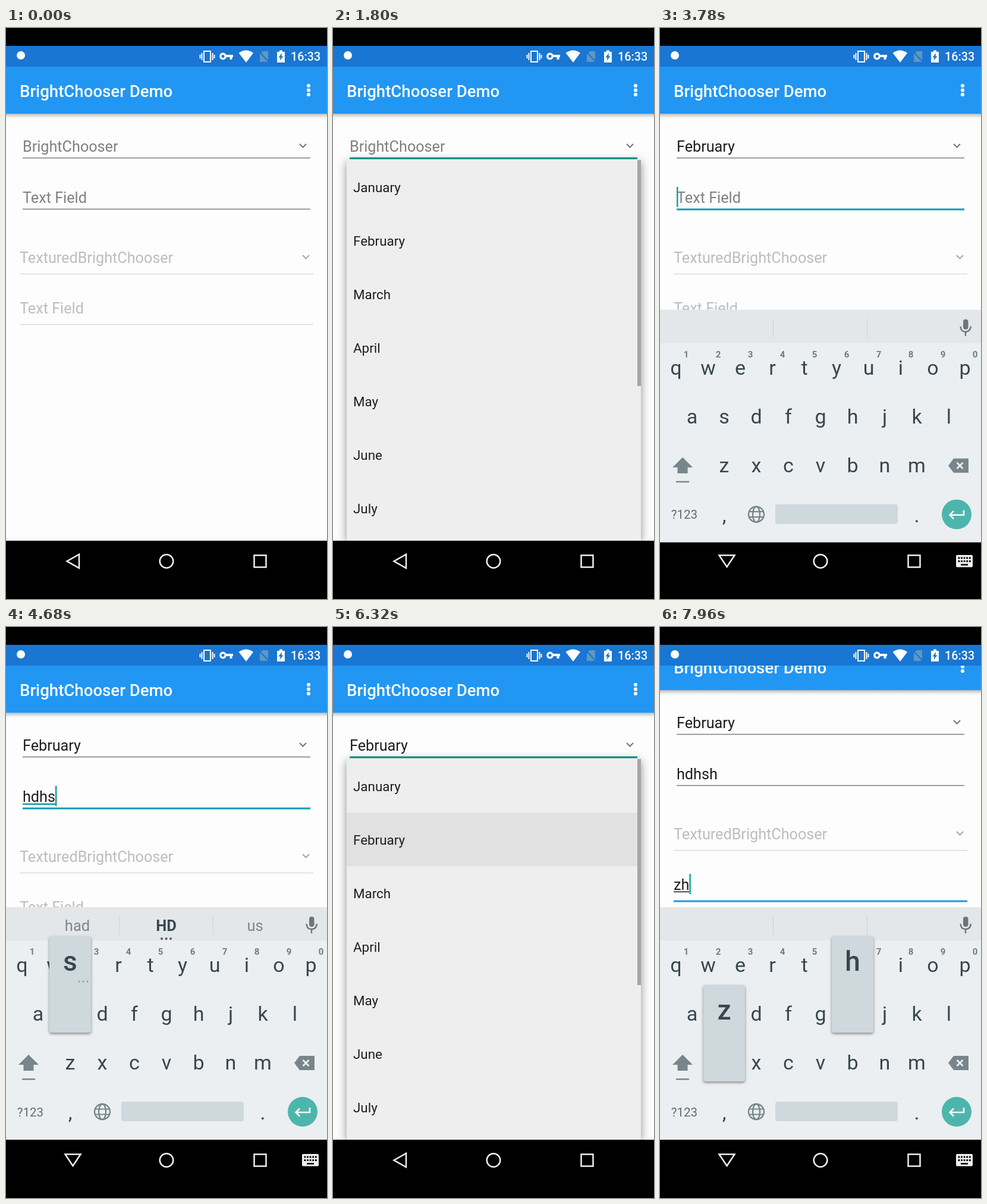
Recreate the animation shown at these times as an HTML page with a canvas. Size 540 by 960 pixels, loop 8000 ms.

```html
<!DOCTYPE html>
<html lang="en">
<head>
<meta charset="utf-8">
<title>Dropdown demo</title>
<style>
html, body { margin: 0; height: 100%; overflow: hidden; background: #000; }
canvas { display: block; width: 100vw; height: 100vh; }
</style>
</head>
<body>
<canvas id="stage" width="540" height="960"></canvas>
<script>
const ctx = document.getElementById('stage').getContext('2d');
const LOOP = 8000;
const INK = '#1e1e1e', HINT = '#808080', PALE = '#bdbdbd', WHITE = '#fdfdfd', NAV = '#f0f0f0';
const BAR = '#2196f3', STATUS = '#1976d2', LIST = '#eeeeee', BOARD = '#eceff1';
const TEAL = '#009688', CYAN = '#0c9bb4', BLUE = '#2199e0';
const MONTHS = ['January', 'February', 'March', 'April', 'May', 'June', 'July', 'August'];
const ROWS = [['qwertyuiop', 27, 580], ['asdfghjkl', 54, 662], ['zxcvbnm', 108, 744]];

// Key presses: letter, press time, release time
const FIRST = [['h', 4110, 4230], ['d', 4270, 4390], ['h', 4430, 4550], ['s', 4590, 4730], ['h', 4740, 4900]];
const SECOND = [['z', 7800, 8000], ['h', 7910, 8000]];
const SUGGESTIONS = [
  [4180, ['he', 'have', 'how']],
  [4390, ['had', 'HD', 'us']],
  [4850, ['handheld', 'sunshine', 'Ushant']]
];

// Times at which each input takes the focus, and the two visits to the list
const FOCUS = { spinner: 500, field: 3380, again: 5360, material: 7220 };
const VISITS = [
  { open: 600, press: 1960, close: 2140 },
  { open: 5460, press: 6260, close: 6340 }
];
const KEYS_IN = [3560, 7434], KEYS_OUT = 5652;

const clamp = v => Math.max(0, Math.min(1, v));
const ramp = (t, start, length) => clamp((t - start) / length);
const easeOut = (p, power = 2) => 1 - (1 - p) ** power;
const within = (t, a, b) => t >= a && t < b;
const typed = (keys, t) => keys.filter(k => t >= k[1] + 20).map(k => k[0]).join('');

function rect(x, y, w, h, color, r = 0) {
  ctx.fillStyle = color;
  ctx.beginPath();
  ctx.roundRect(x, y, w, h, r);
  ctx.fill();
}

function disc(x, y, r, color) {
  ctx.fillStyle = color;
  ctx.beginPath();
  ctx.arc(x, y, r, 0, 7);
  ctx.fill();
}

function ring(x, y, rx, ry, color, width) {
  ctx.strokeStyle = color;
  ctx.lineWidth = width;
  ctx.beginPath();
  ctx.ellipse(x, y, rx, ry, 0, 0, 7);
  ctx.stroke();
}

function fill(d, color) {
  ctx.fillStyle = color;
  ctx.fill(new Path2D(d));
}

function stroke(d, color, width) {
  ctx.strokeStyle = color;
  ctx.lineWidth = width;
  ctx.stroke(new Path2D(d));
}

function text(s, x, y, size, color, align = 'left', weight = 400) {
  ctx.font = `${weight} ${size}px Roboto, sans-serif`;
  ctx.textAlign = align;
  ctx.fillStyle = color;
  ctx.fillText(s, x, y);
  return ctx.measureText(s).width;
}

function shadowed(blur, dy, color, draw) {
  ctx.save();
  ctx.shadowColor = color;
  ctx.shadowBlur = blur;
  ctx.shadowOffsetY = dy;
  draw();
  ctx.restore();
}

function group(draw, alpha = 1, dy = 0) {
  if (alpha <= 0) return;
  ctx.save();
  ctx.globalAlpha = alpha;
  ctx.translate(0, dy);
  draw();
  ctx.restore();
}

function statusBar() {
  rect(0, 30, 540, 35, STATUS);
  disc(25, 46, 7, WHITE);
  stroke('M333 39H344V57H333ZM329.5 42V54M347.5 42V54M326.5 45V51M350.5 45V51', WHITE, 2);
  stroke('M370 47H382M378.5 47V53', WHITE, 4);
  ring(365, 47.5, 4.2, 4.2, WHITE, 3.4);
  fill('M391.5 42Q404 33 416 42L404 58Z', WHITE);
  fill('M432 39H441V57H427V44Z', '#5c98c4');
  stroke('M425 39L442 57', STATUS, 2);
  fill('M456 40H460V37.5H465V40H469V58H456Z', WHITE);
  fill('M464 42L458.5 49.5H461.5L460.5 55L466.5 47.5H463.5Z', STATUS);
  text('16:33', 479, 55, 19.8, WHITE, 'left', 500);
}

function appBar() {
  const shade = ctx.createLinearGradient(0, 143, 0, 153);
  shade.addColorStop(0, 'rgba(110,110,110,.6)');
  shade.addColorStop(1, 'rgba(200,200,200,0)');
  rect(0, 143, 540, 10, shade);
  rect(0, 60, 540, 84, BAR);
  text('BrightChooser Demo', 23, 115.5, 27.6, WHITE, 'left', 500);
  for (const y of [97, 104.5, 112]) disc(509, y, 3.1, WHITE);
}

// One input row; material rows are wider and paler
function field({ y, value, hint, focus, cursor, composing, arrow, material, accent }) {
  const x = material ? 23 : 28, right = material ? 517 : 512;
  const base = y - (material ? 18 : 10);
  const width = text(value || hint, x, base, 25.2, value ? INK : material ? PALE : HINT);
  if (arrow) {
    const cx = right - 12.5;
    stroke(`M${cx - 5.5} ${base - 13}l5.5 5.5l5.5 -5.5`, material ? '#a6a6a6' : '#757575', 2);
  }
  if (focus) rect(x, y - .5, right - x, 3, accent);
  else rect(x, y - .2, right - x, 1.4, material ? '#dadada' : '#7d7d7d');
  if (composing && value) rect(x, base + 2.5, width, material ? 1.5 : 2.5, material ? INK : CYAN);
  if (cursor) rect(x + (value ? width : 0), base - 27, 2.4, 34, '#0ca09a');
}

function content(t) {
  const chosen = t >= VISITS[0].close ? 'February' : '';
  const spinner = within(t, FOCUS.spinner, FOCUS.field) || within(t, FOCUS.again, FOCUS.material);
  const first = within(t, FOCUS.field, FOCUS.again), last = t >= FOCUS.material;
  rect(0, 65, 540, 797, WHITE);
  field({ y: 218, value: chosen, hint: 'BrightChooser', focus: spinner, arrow: true, accent: TEAL });
  field({ y: 304, value: typed(FIRST, t), hint: 'Text Field', focus: first, accent: CYAN,
    composing: first, cursor: within(t, 3450, 3950) || within(t, 4110, 5190) });
  field({ y: 413, hint: 'TexturedBrightChooser', arrow: true, material: true });
  field({ y: 498, value: typed(SECOND, t), hint: 'Text Field', focus: last, material: true,
    accent: BLUE, composing: true, cursor: last });
  appBar();
}

// The list grows out of the spinner line, then fades; its scrollbar fades after a pause
function dropdown(t, { open, press, close }) {
  const grow = ramp(t, open, 400);
  const alpha = easeOut(ramp(t, open, 200), 3) * (1 - ramp(t, close, 210));
  const scale = .9 + .1 * easeOut(grow, 5);
  const bottom = within(t, FOCUS.again, 5900) ? 473 : 862;
  group(() => {
    ctx.translate(270.5, 221);
    ctx.scale(scale, scale);
    ctx.translate(-270.5, -221);
    shadowed(16, 4, 'rgba(70,70,70,.6)', () => rect(23, 221, 495, bottom - 221, LIST, 2));
    ctx.beginPath();
    ctx.rect(23, 221, 495, bottom - 221);
    ctx.clip();
    rect(23, 312, 495, 90, `rgba(90,90,90,${.18 * ramp(t, press, 120)})`);
    MONTHS.forEach((m, i) => text(m, 34, 275.5 + 90 * i, 22.4, INK));
    ctx.globalAlpha *= 1 - ramp(t, open + 1200, 250);
    rect(512, 222, 6, bottom > 500 ? 380 : 58, '#a6a6a6');
  }, alpha);
}

function keyPopup(letter) {
  const row = ROWS.find(r => r[0].includes(letter));
  const x = row[1] + 54 * row[0].indexOf(letter), y = row[2];
  shadowed(4, 2, 'rgba(60,60,60,.6)', () => rect(x - 35, y - 142, 70, 162, '#cfd8dc', 4));
  text(letter, x, y - 84, 46, '#37474f', 'center', 500);
  if (letter === 's') for (const dx of [15, 22, 29]) disc(x + dx, y - 66, 1.6, '#90a0a8');
}

function suggestions(t) {
  const current = t < FOCUS.material && SUGGESTIONS.filter(s => t >= s[0]).pop();
  if (!current) return;
  current[1].forEach((word, i) => {
    const bold = word === 'HD';
    text(word, 120 + 149.5 * i, 511, 25.5, bold ? '#37474f' : '#7b878c', 'center', bold ? 700 : 400);
  });
  for (const x of [262, 269.5, 277]) disc(x, 524, 2, '#4c5a61');
}

function keyboard(t) {
  const key = '#37474f', soft = '#78868c';
  rect(0, 471, 540, 391, BOARD);
  rect(0, 471, 540, 56, '#e4e7e9');
  for (const x of [190, 348]) rect(x, 485, 1, 33, '#cdd2d5');
  suggestions(t);

  rect(510, 487, 8.5, 17, '#6a767b', 4);
  stroke('M505.5 499Q506 508 514 508Q522 508 523 499M514 508V515', '#6a767b', 2.4);

  for (const [letters, x, y] of ROWS)
    [...letters].forEach((c, i) => text(c, x + 54 * i, y, 34, key, 'center'));
  for (let i = 0; i < 10; i++)
    text((i + 1) % 10, 44 + 54 * i, 551, 15, '#6f7c82', 'center', 700);

  fill('M38 719L55 736H46.5V746H29.5V736H21Z', soft);
  rect(27, 759, 22, 2.5, soft);
  fill('M485 733L494 721H519V745H494Z', soft);
  stroke('M499.5 728L509.5 738M509.5 728L499.5 738', BOARD, 2.8);

  text('?123', 41, 822.5, 20.5, '#5f6c72', 'center');
  text(',', 108, 828, 34, key, 'center');
  text('.', 432, 828, 34, key, 'center');
  for (const rx of [13, 6]) ring(162, 815, rx, 13, soft, 2.4);
  stroke('M150 810.5H174M150 819.5H174', soft, 2.2);
  rect(194, 798, 206, 33, '#cfd8dc', 4);
  disc(499, 815, 25, '#4db6ac');
  stroke('M511 808V816H488M494 809.5L487.5 816L494 822.5', WHITE, 2.6);

  for (const [letter, down, up] of [...FIRST, ...SECOND])
    if (within(t, down, up)) keyPopup(letter);
}

function navIcons(keyboardUp) {
  stroke(keyboardUp ? 'M99.5 886.5H125.5L112.5 906Z' : 'M102.5 896.5L123 885V908Z', NAV, 2.5);
  ring(270, 896.5, 11.3, 11.3, NAV, 2.5);
  stroke('M417.5 886.5H437.5V906.5H417.5Z', NAV, 2.5);
  if (!keyboardUp) return;
  rect(498, 886, 28, 20.5, NAV, 2);
  for (let i = 0; i < 5; i++)
    for (const y of [889.5, 895]) rect(501.5 + 4.6 * i, y, 2.8, 3, '#000');
  rect(506, 901, 12, 2.6, '#000');
}

function render(t) {
  const start = t < FOCUS.material ? KEYS_IN[0] : KEYS_IN[1];
  const enter = ramp(t, start, 300);
  const leave = t < FOCUS.material ? ramp(t, KEYS_OUT, 250) : 0;
  const pan = -38 * easeOut(ramp(t, KEYS_IN[1], 280));

  rect(0, 0, 540, 960, '#000');
  group(() => content(t), 1, pan);
  rect(0, 0, 540, 30, '#000');
  statusBar();
  VISITS.forEach(visit => dropdown(t, visit));

  rect(0, 862, 540, 98, '#000');
  const shift = 39 * (1 - easeOut(enter) + leave ** 2);
  group(() => keyboard(t), clamp(enter * 1.4) * (1 - leave ** 2), shift);
  navIcons(enter > 0 && leave === 0);
  if (within(t, start, start + 60)) rect(0, 926.5, 540, 3, NAV);
}

const begin = performance.now();
function frame() {
  render((performance.now() - begin) % LOOP);
  requestAnimationFrame(frame);
}
frame();
</script>
</body>
</html>
```
